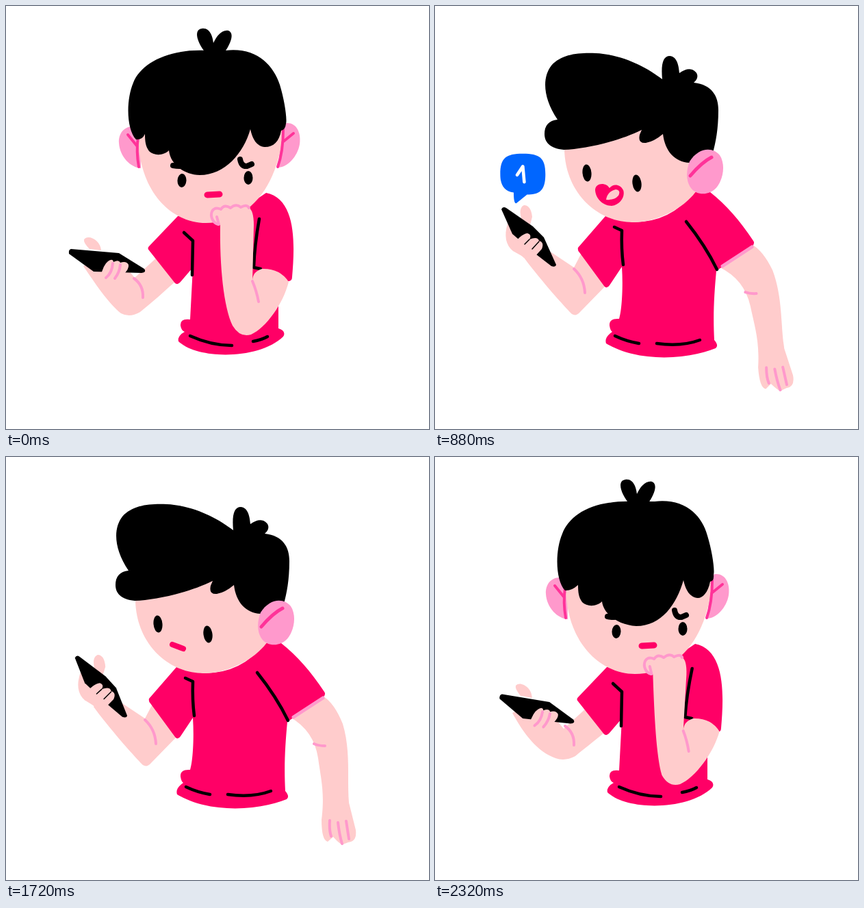
Animation of 618x618 px, one loop 2400 ms. Source, as an HTML page:

```html
<!DOCTYPE html>
<html lang="en">
<head>
<meta charset="utf-8">
<title>Waiting for a message</title>
<style>
html, body { margin: 0; width: 100%; height: 100%; overflow: hidden; background: #fff; }
svg { display: block; width: 100%; height: 100%; }
</style>
</head>
<body>
<svg id="stage" viewBox="0 0 618 618"></svg>
<script>
const SKIN = '#ffcccc', RED = '#ff0066', PINK = '#ff99cc', HOT = '#ff3399', BLUE = '#0066ff', BLACK = '#000';
const LOOP = 2400;

const fill = (color, d) => `<path fill="${color}" d="${d}"/>`;
const line = (color, width, d) =>
  `<path fill="none" stroke="${color}" stroke-width="${width}" stroke-linecap="round" stroke-linejoin="round" d="${d}"/>`;
const group = (transform, ...parts) => `<g transform="${transform}">${parts.join('')}</g>`;
const eye = (x, y, rx, ry, turn = 0) =>
  `<ellipse cx="${x}" cy="${y}" rx="${rx}" ry="${ry}" transform="rotate(${turn} ${x} ${y})"/>`;
const scaleAt = (x, y, s) => `translate(${x} ${y}) scale(${s}) translate(${-x} ${-y})`;

const sparks = line(BLUE, 5, 'M98 318L101 325M127 316L125 321M152 324L149 329');

const bubble = size => group(scaleAt(117, 289, size),
  fill(BLUE, 'M128 218C152 218 160 224 160 247C160 270 152 276 134 276L119 288Q115 290 115 273C101 271 96 262 96 247C96 224 104 218 128 218Z'),
  line('#fff', 4.5, 'M120 248L128 236L130 258'));

const frontHead = k =>
  group(`translate(${-3 * k} 0)`,
    fill(PINK, 'M196 178C176 171 164 184 165 200C166 220 182 236 197 237Z')) +
  fill(PINK, 'M405 172C420 167 432 180 429 202C426 220 411 236 397 236Z') +
  fill(SKIN, `M${193 - 2 * k} 185C${192 - 2 * k} 270 241 317 292 317C350 317 398 270 405 180Z`) +
  group(`translate(${-3 * k} 0)`, line(HOT, 4, 'M193 191Q190 213 194 235M178 188L191 204')) +
  line(HOT, 4, 'M405 180Q405 213 397 235M420 186L404 199');

// k leans the pose to the right: 0 is at rest
function worried(k) {
  const b = 6 * k, c = 11 * k;
  return fill(SKIN, `M113 ${380 - 6 * k}C130 405 150 ${435 - 4 * k} ${168 + 8 * k} ${449 - 9 * k}Q${181 + 9 * k} ${456 - 11 * k} ${196 + 9 * k} ${447 - 10 * k}
    C215 ${432 - 4 * k} 232 416 248 402L222 366L188 397L170 375L140 360Z`) +
  group(`rotate(${4.5 * k} 204 388)`,
    fill(SKIN, 'M114 341C120 333 138 342 139 357L122 355Q113 346 114 341Z'),
    fill(BLACK, 'M95 355L165 361L202 384Q206 389 198 390L128 388L92 362Q91 356 95 355Z'),
    fill(SKIN, 'M138 396Q142 378 149 373Q156 368 157 374Q165 370 167 375Q176 372 179 378Q180 384 172 392L165 402L145 402Z'),
    line(PINK, 4, 'M156 376Q155 390 146 397M167 378Q166 389 159 398')) +
  group(`translate(${3 * k} ${-5 * k})`, line(PINK, 4, 'M187 398Q201 408 200 426')) +
  fill(RED, 'M251 307L209 351Q206 354 209 357L247 405Q251 408 255 403L273 382L269 458Q254 456 255 467Q256 474 261 476Q250 482 252 490C280 517 370 517 405 483Q410 475 398 471L398 420L412 402Q418 402 418 396C422 350 425 282 380 273L340 300Z') +
  line(BLACK, 4.5, 'M260 331L273 343L272 393M269 482Q300 496 330 496M361 490Q373 488 382 483') +
  frontHead(k) +
  group(`translate(${-8 * k} 0)`,
    fill(BLACK, 'M293 70C280 55 273 35 286 33C298 31 302 45 303 54C308 43 316 34 325 36C334 40 329 54 318 70Z')) +
  fill(BLACK, `M190 195C176 180 175 138 186 112C197 84 ${236 - 6 * k} 63 290 65L321 65C365 60 390 85 ${400 - 2 * k} 115C${407 - 2 * k} 138 ${411 - 2 * k} 165 ${409 - 2 * k} 172Q408 181 402 182
    C399 198 391 206 ${378 + b} 206C${366 + b} 205 ${360 + b} 194 ${357 + b} 180C${347 + b} 215 ${320 + c} 247 ${283 + c} 247
    C${258 + c} 246 ${240 + b} 230 ${238 + b} 211C${230 + b} 219 ${216 + b} 219 ${209 + b} 212C${204 + b} 205 ${203 + b} 198 ${203 + b} 187Q199 196 190 195Z`) +
  group(`translate(${8 * k} 0)`,
    line(BLACK, 8, 'M244 233Q254 235 262 233M342 224Q344 235 352 234L359 231'),
    eye(257, 255, 6.5, 10, 3), eye(354, 251, 6.5, 10),
    line(RED, 9, 'M294 276L312 275')) +
  group(`translate(${16 * k} ${-2 * k}) skewX(${-1.9 * k})`,
    line(BLACK, 4.5, 'M370 311Q363 350 362 382L372 384'),
    fill(SKIN, `M313 320C${312 + 5 * k} 380 ${318 + 4 * k} 440 331 467Q342 485 358 480C380 470 405 435 413 403Q400 383 374 384Q360 388 360 402L362 320Q362 298 354 294Q330 290 303 298Q299 310 308 318Z`),
    line(PINK, 4, 'M310 319C302 317 298 307 301 300Q305 293 314 297Q319 289 328 295Q336 288 343 294Q352 289 355 295M308 308L311 319M360 402Q366 416 369 432'));
}

const startled = () =>
  fill(SKIN, 'M134 385C145 420 170 455 195 459Q205 460 215 448L248 408L214 361L200 390L185 380Z') +
  fill(SKIN, 'M126 301Q135 293 140 304L148 334L130 328Z') +
  fill(BLACK, 'M109 312Q113 308 119 314L150 340L182 353Q190 360 205 392Q205 396 198 396L150 394L122 389Q117 385 110 325Z') +
  fill(SKIN, 'M157 390Q158 378 165 377Q172 370 180 376Q192 374 194 385L192 400L165 402L150 394Z') +
  line(PINK, 4, 'M172 386L161 398M184 389L174 403M195 398Q214 410 210 438') +
  fill(RED, 'M251 304L207 352L244 406Q250 412 254 404L271 383L270 456Q253 453 254 463Q256 472 261 475Q250 480 252 489C280 508 345 520 385 512Q400 508 399 495L398 420L440 410L460 349L467 341C445 315 425 290 405 270L380 265Q350 300 290 311Z') +
  line(BLACK, 4.5, 'M257 329L271 341L273 384M370 311L411 386M270 482Q290 492 310 496M380 493L398 488') +
  fill(PINK, 'M177 209Q177 230 192 232L194 209Z') +
  fill(SKIN, 'M189 210C190 270 236 311 289 311C330 310 370 285 385 260L385 190L190 190Z') +
  fill(BLACK, 'M175 165C150 135 148 100 175 80C200 64 240 61 280 64C273 45 280 31 290 31Q301 32 308 40C320 28 338 33 350 43Q363 55 372 72C400 90 412 120 411 172L385 200Q380 228 355 232Q342 231 335 220Q310 250 280 249C255 247 243 232 236 215Q222 221 207 214C180 218 155 205 155 187C156 172 165 167 175 165Z') +
  fill(PINK, 'M395 185C405 165 430 165 429 190C428 225 418 265 390 275C372 278 364 265 365 245C366 215 385 210 395 185Z') +
  line(BLACK, 8, 'M205 238Q213 243 223 244M267 254Q320 255 354 244') +
  fill(RED, 'M243 272Q244 264 255 265L295 269Q304 269 302 274C295 286 275 286 263 285Q245 281 243 272Z') +
  fill(SKIN, 'M290 325Q290 310 310 307Q325 308 328 325Q334 335 335 350Q345 400 390 406Q435 410 455 348Q464 346 476 360C497 382 510 408 510 450L510 562Q495 575 480 568Q465 560 464 545L457 508L450 550Q450 575 417 586Q395 570 397 545L399 480L396 474L352 520Q345 533 330 533Q300 535 293 523Q290 510 320 480L349 452Q300 410 297 358Q290 345 290 325Z') +
  line(BLACK, 4.5, 'M463 344Q450 350 427 372M348 338L361 390') +
  line(PINK, 4, 'M294 325Q300 330 301 337M302 314Q310 320 312 330M311 308Q317 313 319 321M460 360Q470 395 466 428M464 437L454 496M453 407Q440 455 400 462M357 451L385 435M395 425L410 415M314 504Q304 512 301 525M327 509L318 525M341 511L332 528M408 552Q409 572 416 583M420 550L423 575M433 548L436 568M472 548L483 567M483 548L495 565');

const smile =
  fill(RED, 'M255 266C250 257 234 258 234 269C235 283 247 292 258 292C272 290 278 277 275 269C270 259 259 260 255 266Z') +
  fill(SKIN, 'M250 283Q252 271 264 268Q272 269 268 277Q262 284 250 283Z');

// smiling: size of the open mouth, lid: eye opening, swing: angle of the free arm
function reading({ tilt = 0, smiling = 1, lid = 1, swing = 0 }) {
  return fill(SKIN, 'M128 365C150 395 185 435 200 450Q206 454 212 447L250 408L214 361L203 382L170 360L140 345Z') +
  group(`rotate(${tilt} 177 380)`,
    fill(SKIN, 'M106 318Q98 345 114 358L132 368L150 350L135 325Z'),
    fill(SKIN, 'M127 314Q121 295 130 291Q140 291 142 308L138 324Z'),
    fill(BLACK, 'M97 297Q99 292 104 295L143 322L159 338L177 378Q176 382 170 380L148 363L113 333Z'),
    fill(SKIN, 'M112 352Q125 333 135 332Q142 334 138 341Q150 336 152 343Q160 345 156 355L146 366L130 368Z'),
    line(BLACK, 1.5, 'M138 341L131 348M152 344L142 355')) +
  line(PINK, 4, 'M203 384Q218 398 219 419') +
  group(`rotate(${swing} 440 370)`,
    fill(SKIN, 'M415 380Q450 400 456 440C460 470 466 490 461 530Q461 560 470 562L478 555Q490 568 492 566L500 563Q513 562 511 545L501 505C498 470 504 430 492 390Q480 360 464 350Z'),
    line(PINK, 4, 'M450 419Q457 422 466 422M473 531Q472 545 475 554M485 534Q487 552 491 565M497 532L501 558')) +
  fill(RED, 'M249 307L209 353Q208 357 211 360L247 409Q251 414 255 408L273 381C275 410 273 445 269 457Q254 456 255 467Q256 474 259 476Q247 484 250 493C295 520 365 518 410 500Q415 496 408 488C406 450 408 420 411 387L463 351Q468 347 465 343C445 313 425 290 402 272L378 272Q345 316 289 316Z') +
  line(PINK, 5, 'M420 380L463 352') +
  line(BLACK, 4.5, 'M262 323L273 328Q272 355 275 378M367 315Q395 350 412 385M263 482Q280 490 298 493M324 493Q360 498 387 488') +
  fill(SKIN, 'M189 205C188 270 235 316 289 316C330 316 370 290 383 268L385 200L300 175Z') +
  fill(BLACK, 'M179 166C158 135 156 105 170 87C185 70 210 68 235 69C275 71 310 90 332 107C330 85 333 73 343 73C353 74 356 85 357 98Q368 90 376 93C386 98 385 106 378 112C405 115 414 132 414 152C414 180 410 200 406 214L372 229C350 228 336 212 333 187Q320 198 308 200Q296 201 299 188L302 181C270 197 220 209 188 210C168 208 160 199 160 187Q160 168 179 166Z') +
  fill(PINK, 'M372 227C385 207 405 205 416 218C424 230 422 250 413 263C403 277 383 278 374 266C366 255 367 240 372 227Z') +
  line(HOT, 5, 'M373 248Q390 228 404 221') +
  eye(222, 244, 6.5, 12.5 * lid, -5) + eye(295, 259, 6.5, 12.5 * lid, -8) +
  (smiling ? group(scaleAt(253, 277, smiling), smile) : line(RED, 8, 'M243 274L259 280'));
}

const lowered = () =>
  fill(SKIN, 'M130 407Q160 405 185 406Q192 405 198 397L214 370L242 415L220 438Q210 446 200 445L160 437L130 432Z') +
  fill(SKIN, 'M75 420Q88 442 105 446Q125 448 143 440L140 410L90 405Z') +
  fill(SKIN, 'M83 383Q92 374 103 388Q107 397 105 403L92 402Z') +
  fill(BLACK, 'M59 397Q60 393 66 394L132 408L166 436Q168 441 160 441L92 431L62 406Z') +
  fill(SKIN, 'M90 432Q96 412 104 413Q109 417 107 423Q113 407 120 413L121 424Q129 420 132 430Q128 446 105 446Q90 442 90 432Z') +
  line(PINK, 4, 'M190 406Q196 407 201 410') +
  fill(RED, 'M253 309L207 362Q205 365 208 368L243 422Q247 428 253 422L270 398L268 464Q255 468 256 477Q256 483 260 485Q252 497 254 507Q310 518 375 512L371 420L423 427Q427 427 425 418C417 360 405 310 373 284Q340 317 292 317Z') +
  fill(SKIN, 'M370 418L411 426C412 500 417 550 417 590Q413 606 405 605L390 602Q377 590 378 575C376 500 371 450 370 418Z') +
  line(PINK, 4, 'M370 419Q390 420 408 425M388 583L393 603M396 583L402 600M405 579L410 602') +
  line(BLACK, 4.5, 'M258 335L270 345L270 398M360 317Q355 370 357 417L367 418M262 487Q285 496 309 497M332 498L351 498') +
  frontHead(0) +
  fill(BLACK, 'M181 186C172 165 178 125 200 100C225 74 265 68 312 79C306 65 306 45 317 43C327 44 330 55 331 67Q340 48 349 47Q358 49 356 58Q351 70 344 81C380 78 405 110 411 140C414 160 413 175 406 188L395 189C389 205 381 213 372 213C362 211 359 200 360 188C345 220 318 244 275 244C248 244 230 230 229 209C215 217 201 214 197 205Q194 195 197 181Q189 190 181 186Z') +
  eye(238, 250, 7, 12.5) + eye(335, 250, 9, 13.5) +
  line(RED, 8, 'M281 275L300 274.5');

const steps = [
  [0, worried(0)],
  [640, worried(0) + sparks],
  [720, worried(0) + bubble(.6)],
  [800, startled() + bubble(1.06)],
  [880, reading({ swing: -4 }) + bubble(1.03)],
  [960, reading({}) + bubble(1)],
  [1240, reading({ tilt: .4 }) + bubble(1.06)],
  [1320, reading({ tilt: .8 }) + bubble(.65)],
  [1400, reading({ tilt: 1.2, smiling: .8 }) + bubble(.25)],
  [1480, reading({ tilt: 1.6, smiling: .55, lid: .6 })],
  [1560, reading({ tilt: 2, smiling: 0, lid: .2 })],
  [1640, reading({ tilt: 2.3, smiling: 0, lid: .6 })],
  [1720, reading({ tilt: 2.5, smiling: 0 })],
  [2080, reading({ tilt: 2.5, smiling: 0, lid: .3, swing: -4 })],
  [2160, lowered()],
  [2240, worried(1.3)],
  [2320, worried(1)]
];

const stage = document.getElementById('stage');
let shown;
function tick() {
  const t = performance.now() % LOOP;
  const step = steps.findLast(([start]) => start <= t);
  if (step !== shown) stage.innerHTML = (shown = step)[1];
  requestAnimationFrame(tick);
}
tick();
</script>
</body>
</html>
```
